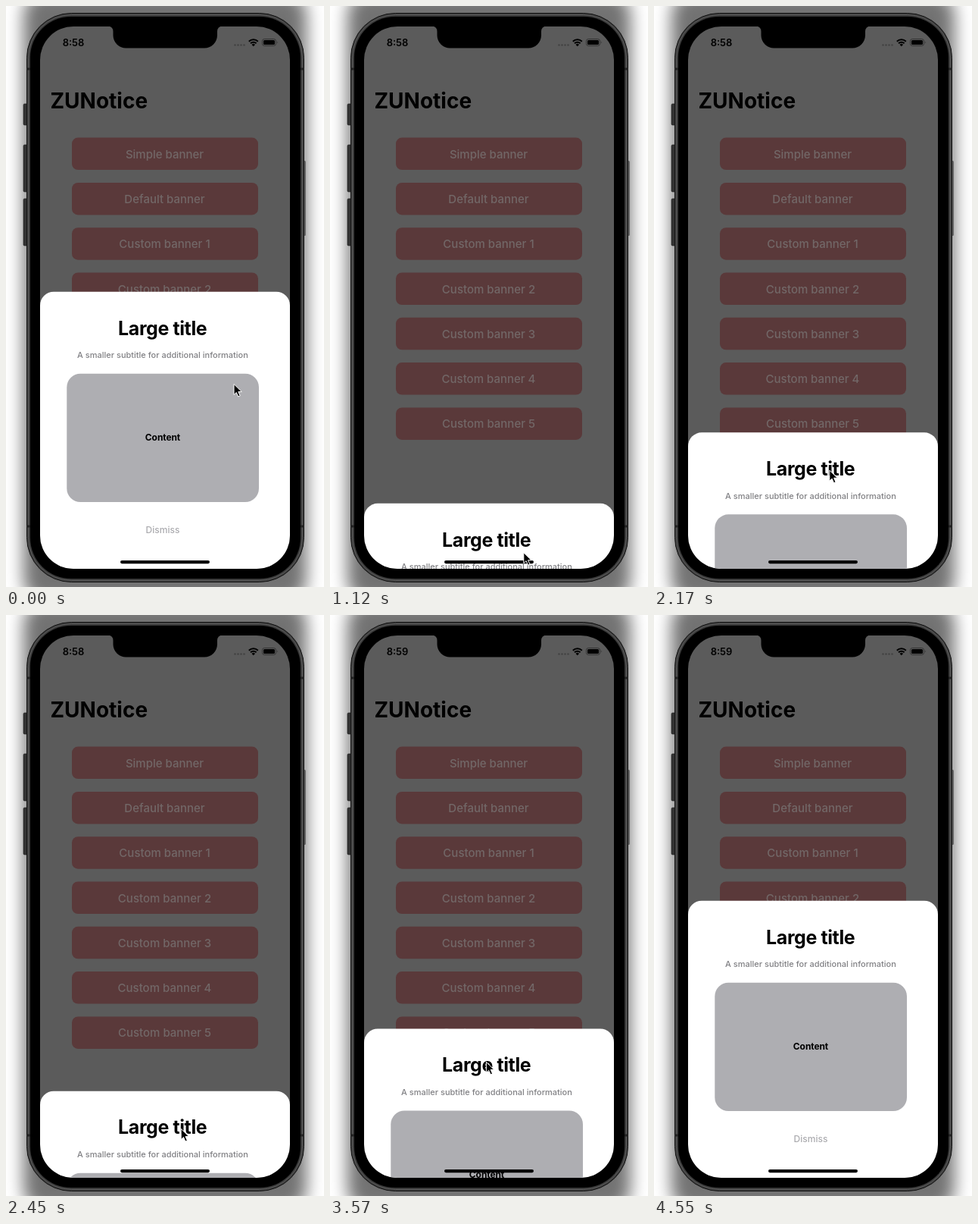
These frames come from a looping animation (420 by 766 pixels, 4620 ms). An HTML page:

```html
<!DOCTYPE html>
<html lang="en">
<head>
<meta charset="utf-8">
<title>Bottom sheet</title>
<style>
html, body { margin: 0; width: 100%; height: 100%; overflow: hidden; background: #fff; }
svg { display: block; width: 100vw; height: 100vh; font-family: Inter, Roboto, sans-serif; }
.mid { text-anchor: middle; }
</style>
</head>
<body>
<svg viewBox="0 0 420 766">
  <defs>
    <filter id="blur" x="-30%" y="-30%" width="160%" height="160%"><feGaussianBlur stdDeviation="11"/></filter>
    <clipPath id="screen"><rect x="45" y="27" width="330" height="715" rx="44"/></clipPath>
  </defs>

  <rect x="23" y="-18" width="374" height="804" rx="30" opacity=".55" filter="url(#blur)"/>

  <!-- phone body -->
  <g fill="#333" stroke="#1b1b1b" stroke-width=".6">
    <rect x="23" y="129" width="6" height="28" rx="1.5"/>
    <rect x="23" y="183" width="6" height="62" rx="1.5"/>
    <rect x="23" y="254" width="6" height="62" rx="1.5"/>
  </g>
  <rect x="391" y="204" width="5" height="99" rx="1.5" fill="#666"/>
  <rect x="27.5" y="9.5" width="366" height="750" rx="59" fill="#3a3a3a" stroke="#161616"/>
  <rect x="29.5" y="11.5" width="362" height="746" rx="57" fill="none" stroke="#5c5c5c"/>
  <path d="M27 83h5M389 83h5M27 686h5M389 686h5" stroke="#222" stroke-width="3"/>
  <rect x="32" y="14" width="357" height="741" rx="54"/>

  <g clip-path="url(#screen)">
    <rect x="45" y="27" width="330" height="715" fill="#5b5b5b"/>
    <text id="clock" class="mid" x="89" y="53" font-size="13" font-weight="600">8:58</text>
    <path d="M302.5 51.5h12.1" stroke="#434343" stroke-width="2.6" stroke-linecap="round" stroke-dasharray="0 4"/>
    <path d="M320.8 46.8a8.6 8.6 0 0 1 12 0M323 49.2a5.4 5.4 0 0 1 7.6 0" fill="none" stroke="#000" stroke-width="2"/>
    <path d="M326.8 53.2l-2.2-2.3a3.2 3.2 0 0 1 4.4 0z"/>
    <rect x="338.5" y="43.5" width="18" height="9" rx="2.8" fill="none" stroke="#333"/>
    <rect x="340" y="45" width="15" height="6" rx="1.5"/>
    <path d="M358 46.3q1.6 1.7 0 3.4z" fill="#333"/>

    <text x="58.5" y="135" font-size="28" font-weight="700">ZUNotice</text>
    <g id="buttons" class="mid" font-size="15" font-weight="500"></g>

    <g id="sheet">
      <rect x="45" y="376.7" width="330" height="500" rx="18" fill="#fff"/>
      <g class="mid">
        <text x="206.7" y="433.5" font-size="25" font-weight="700" letter-spacing="-.4">Large title</text>
        <text x="207" y="464" font-size="11" font-weight="500" fill="#808084">A smaller subtitle for additional information</text>
        <rect x="80.3" y="484.7" width="253.7" height="169.3" rx="18" fill="#aeaeb2"/>
        <text x="207" y="573.3" font-size="12" font-weight="700" letter-spacing="-.1">Content</text>
        <text x="207" y="695" font-size="12" font-weight="500" fill="#aaaaae">Dismiss</text>
      </g>
    </g>
    <rect x="151" y="731" width="118" height="4.2" rx="2.1"/>
  </g>

  <path d="M135 26.5q6.5 1 6.5 7V39a17 17 0 0 0 17 16.5H262a17 17 0 0 0 17-16.5V33.5q0-6 6.5-7z"/>
  <path id="cursor" d="M0 .5V14.5L3.3 11.5L5.7 17L8.2 16L5.8 10.6H10.3z" stroke="#fff"/>
</svg>
<script>
const LOOP = 4620, STEP = 70;
const el = id => document.getElementById(id);

el("buttons").innerHTML = ["Simple banner", "Default banner",
  ...[1, 2, 3, 4, 5].map(n => "Custom banner " + n)].map((label, i) => {
  const y = 173.6 + i * 59.3;
  return `<rect x="87" y="${y}" width="246" height="42.5" rx="8" fill="#5a393a"/>
    <text x="209.5" y="${y + 27}" fill="#726767">${label}</text>`;
}).join("");

// Cursor stops; the sheet follows on the way to a stop that has a grip height.
const stops = [
  { t: 0, x: 301, y: 498 },
  { t: 420, x: 252, y: 416 },
  { t: 700, x: 252, y: 416 },
  { t: 1190, x: 256, y: 736, grip: 441 },
  { t: 1610, x: 234, y: 403, grip: 441 },
  { t: 1780, x: 234, y: 403 },
  { t: 2380, x: 231, y: 690, grip: 426 },
  { t: 2870, x: 235, y: 426, grip: 426 },
  { t: 3150, x: 226, y: 397 },
  { t: 3300, x: 226, y: 397 },
  { t: 3750, x: 196, y: 690, grip: 420 },
  { t: 4130, x: 228, y: 405, grip: 420 },
  { t: 4270, x: 228, y: 405 },
  { t: 4410, x: 241, y: 408 },
  { t: LOOP, x: 241, y: 408 }
];

function cursorAt(t) {
  const i = stops.findIndex(s => s.t > t), a = stops[i - 1], b = stops[i];
  const k = (1 - Math.cos(Math.PI * (t - a.t) / (b.t - a.t))) / 2;
  return { x: a.x + (b.x - a.x) * k, y: a.y + (b.y - a.y) * k, grip: b.grip ?? Infinity };
}

function draw(now) {
  const t = Math.floor(now % LOOP / STEP) * STEP;
  const { x, y, grip } = cursorAt(t);
  el("sheet").setAttribute("transform", `translate(0 ${Math.max(0, y - grip)})`);
  el("cursor").setAttribute("transform", `translate(${x} ${y})`);
  el("cursor").style.display = t < 4550 ? "" : "none";
  el("clock").textContent = t < 2590 ? "8:58" : "8:59";
}

let start;
function tick(now) {
  start ??= now;
  draw(now - start);
  requestAnimationFrame(tick);
}
draw(0);
requestAnimationFrame(tick);
</script>
</body>
</html>
```
